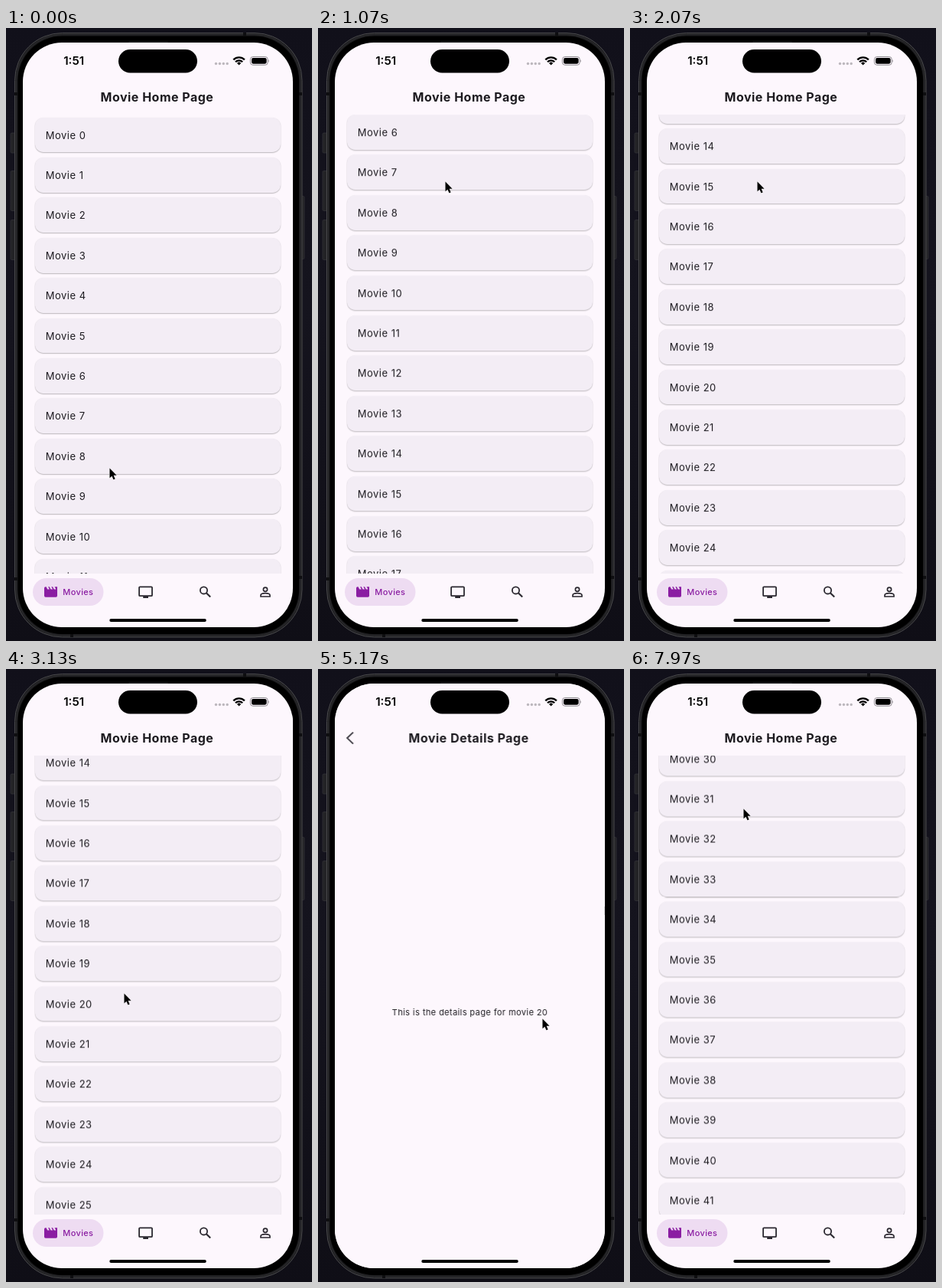
Recreate the animation shown at these times as an HTML page. Size 400x800 px, loop 8 s.

```html
<!DOCTYPE html>
<html lang="en">
<head>
<meta charset="utf-8">
<title>Movie list</title>
<style>
  html, body { margin: 0; width: 100%; height: 100%; overflow: hidden; background: #100f17; }
  #stage { position: absolute; left: 0; top: 0; width: 400px; height: 800px; overflow: hidden;
    background: linear-gradient(#11101a, #15141e 45%, #0f0e16);
    font-family: Inter, "Liberation Sans", sans-serif; color: #1d1b20; }
  svg { position: absolute; left: 0; top: 0; display: block; }
  text { fill: #1d1b20; font-family: Inter, "Liberation Sans", sans-serif; }
  #screen { position: absolute; left: 22px; top: 19px; width: 353px; height: 763px;
    border-radius: 51px; overflow: hidden; background: #fdf7fd; }
  #screen svg { left: -22px; top: -19px; }
  #view { position: absolute; left: 0; top: 94px; width: 353px; height: 599px; overflow: hidden; }
  #list, #page { position: absolute; left: 0; top: 0; width: 353px; will-change: transform; }
  #page { height: 763px; overflow: hidden; background: #fdf7fd; }
  .card { position: absolute; left: 16.3px; width: 320.4px; height: 45.8px; border-radius: 10.8px;
    background: #f3edf5; box-shadow: 0 1px 1.4px rgba(0,0,0,.21), 0 .4px 1.6px rgba(0,0,0,.1);
    font-size: 13px; line-height: 46px; letter-spacing: .5px; text-indent: 13.4px; white-space: nowrap; }
  .title { font-size: 16px; font-weight: 700; letter-spacing: .48px; }
  .line { fill: none; stroke: #2b2830; stroke-width: 1.8; }
</style>
</head>
<body>
<div id="stage">
  <svg width="400" height="800">
    <g fill="#232326" stroke="#36363a" stroke-width=".7">
      <rect x="6" y="137" width="8" height="26" rx="1.5"/>
      <rect x="6" y="186.500" width="8" height="52" rx="1.5"/>
      <rect x="6" y="250.500" width="8" height="52" rx="1.5"/>
      <rect x="384" y="219.500" width="6" height="82" rx="1.5"/>
    </g>
    <rect x="11.500" y="6.500" width="375.500" height="788.500" rx="62" fill="#1d1d1f" stroke="#4a4a4d"/>
    <rect x="13.500" y="8.500" width="371.500" height="784.500" rx="60" fill="none" stroke="#2d2d30"/>
    <g fill="#0e0e10">
      <rect x="310" y="6" width="4" height="4"/><rect x="84" y="791" width="4" height="4"/>
      <rect x="11" y="84" width="4" height="4"/><rect x="383" y="84" width="4" height="4"/>
      <rect x="11" y="717" width="4" height="4"/><rect x="383" y="715" width="4" height="4"/>
    </g>
    <rect x="15.500" y="10.500" width="367.500" height="780.500" rx="58" fill="#000"/>
    <rect x="160" y="17" width="52" height="1.500" rx=".7" fill="#202022"/>
  </svg>

  <div id="screen">
    <div id="view"><div id="list"></div></div>
    <svg width="400" height="800">
      <text class="title" x="123.600" y="95.800">Movie Home Page</text>
      <rect x="35" y="718" width="92.500" height="36" rx="18" fill="#eedcf2"/>
      <path fill="#8a1da2" transform="translate(48.3 725.800) scale(.85)"
        d="M18 4l2 4h-3l-2-4h-2l2 4h-3l-2-4H8l2 4H7L5 4H4a2 2 0 0 0-2 2v12a2 2 0 0 0 2 2h16a2 2 0 0 0 2-2V4z"/>
      <text x="74.300" y="740" style="font-size:11px;font-weight:500;letter-spacing:.36px;fill:#8a1da2">Movies</text>
      <g class="line">
        <rect x="174.100" y="729.300" width="16.900" height="11.900" rx="1"/>
        <path d="M179.200 743H186" stroke-width="2"/>
        <circle cx="258.500" cy="733.900" r="4.600"/>
        <path d="M261.800 737.300L267.200 742.600" stroke-width="2.100"/>
        <circle cx="339" cy="732.800" r="2.600" stroke-width="1.700"/>
        <path d="M333 742V740.300C333 738.300 336.800 737.600 339 737.600S345 738.300 345 740.300V742Z" stroke-width="1.700"/>
      </g>
    </svg>
    <div id="page">
      <svg width="400" height="800">
        <circle id="press" cx="42" cy="90.200" r="16.300" fill="#1d1b20"/>
        <path d="M46 82.600L38.200 90.100L46 97.600" fill="none" stroke="#45424a" stroke-width="2"/>
        <text class="title" x="118.500" y="95.800">Movie Details Page</text>
        <text x="96.800" y="451.900" style="font-size:11px;letter-spacing:.41px">This is the details page for movie 20</text>
      </svg>
    </div>
  </div>

  <svg width="400" height="800">
    <rect x="147" y="28" width="103" height="30.500" rx="15.250"/>
    <text x="88.700" y="48.300" text-anchor="middle" style="font-size:15.2px;font-weight:600;fill:#000">1:51</text>
    <g fill="#bcb7bd">
      <circle cx="274.500" cy="46.500" r="1.700"/><circle cx="279.400" cy="46.500" r="1.700"/>
      <circle cx="284.300" cy="46.500" r="1.700"/><circle cx="289.200" cy="46.500" r="1.700"/>
    </g>
    <g fill="none" stroke="#000" stroke-width="2.300">
      <path d="M297.300 41.400A10.300 10.300 0 0 1 311.900 41.400"/>
      <path d="M300 44.200A6.500 6.500 0 0 1 309.200 44.200"/>
    </g>
    <path d="M304.600 48.500L302 45.900A3.700 3.700 0 0 1 307.200 45.900Z"/>
    <rect x="319.400" y="37.500" width="22.800" height="10.800" rx="3.400" fill="none" stroke="#8f8b91"/>
    <rect x="321" y="39.100" width="19.600" height="7.600" rx="2.100"/>
    <path d="M343.200 41.200Q345 42.900 343.200 44.700Z" fill="#8f8b91"/>
    <rect x="135.300" y="771" width="126.500" height="4" rx="2"/>
    <g id="cursor" style="filter:drop-shadow(0 .6px .7px rgba(0,0,0,.25))">
      <path transform="translate(.5 .5) scale(.9)" d="M0 0V14.200L3.300 11.300L5.500 16.500L7.900 15.500L5.700 10.400H10Z"
        stroke="#fff" stroke-width=".9" paint-order="stroke"/>
    </g>
  </svg>
</div>

<script>
const LOOP = 8000, PITCH = 52.4, WIDTH = 353, FRICTION = 2.1;
const $ = id => document.getElementById(id);
const list = $('list'), page = $('page'), press = $('press'), cursor = $('cursor');

for (let i = 0; i < 45; i++) {
  const card = document.createElement('div');
  card.className = 'card';
  card.textContent = 'Movie ' + i;
  card.style.top = (3.6 + i * PITCH) + 'px';
  list.append(card);
}

// Each swipe: a drag that speeds up, then a fling that dies away and is held at stop.
const swipes = [
  { start: 640, end: 1070, from: 0, drag: 316.9, power: 1.305, glide: 458, stop: 750.7 },
  { start: 7480, end: 7720, from: 750.7, drag: 378, power: 1.516, glide: 1137, stop: Infinity }
];

// Pointer stops: time, x, y
const stops = [
  [0, 135, 574], [200, 140, 560], [640, 165, 517], [1070, 166, 200],
  [2480, 166, 200], [2950, 154, 423], [3630, 154, 423], [3780, 118, 290],
  [3930, 109, 120], [4030, 150, 67], [4160, 240, 110], [4290, 288, 330],
  [4430, 268, 590], [4480, 255, 616], [4640, 202, 590], [4850, 240, 500],
  [5030, 297, 470], [5170, 293, 456], [5470, 293, 456], [5560, 288, 470],
  [5800, 190, 320], [6100, 45, 130], [6160, 40, 112], [6270, 53, 98],
  [6530, 53, 98], [6565, 53, 97], [6600, 53, 98], [7130, 53, 98],
  [7440, 140, 560], [7480, 142, 560], [7720, 148, 182], [8000, 148, 182]
];

const clamp = v => Math.max(0, Math.min(1, v));
const ramp = (t, start, length) => clamp((t - start) / length);

function scrollAt(t) {
  const s = t < swipes[1].start ? swipes[0] : swipes[1];
  const dragged = s.drag * Math.pow(ramp(t, s.start, s.end - s.start), s.power);
  const coast = Math.max(0, t - s.end) / 1000;
  return Math.min(s.stop, s.from + dragged + s.glide * (1 - Math.exp(-FRICTION * coast)));
}

function slope(i, k) {
  const a = stops[i], b = stops[i + 1];
  return a && b ? (b[k] - a[k]) / (b[0] - a[0]) : 0;
}

// Harmonic mean keeps the curve from overshooting its stops.
function tangent(i, k) {
  const a = slope(i - 1, k), b = slope(i, k);
  return a * b > 0 ? 2 * a * b / (a + b) : 0;
}

function pointer(t, k) {
  let i = 0;
  while (i < stops.length - 2 && t >= stops[i + 1][0]) i++;
  const a = stops[i], b = stops[i + 1], h = b[0] - a[0];
  const u = ramp(t, a[0], h), v = 1 - u;
  return v * v * (1 + 2 * u) * a[k] + u * u * (3 - 2 * u) * b[k]
    + h * u * v * (v * tangent(i, k) - u * tangent(i + 1, k));
}

function pointerY(t) {
  const s = swipes.find(w => t >= w.start && t < w.end);
  if (!s) return pointer(t, 2);
  return pointer(s.start, 2) - (scrollAt(t) - s.from);
}

function draw(t) {
  const scroll = scrollAt(t);
  const shown = ramp(t, 3130, 300) - ramp(t, 6800, 300);
  list.style.transform = `translateY(${-scroll}px)`;
  page.style.transform = `translateX(${WIDTH * (1 - shown)}px)`;
  page.style.visibility = shown > 0 ? 'visible' : 'hidden';
  press.style.opacity = .11 * ramp(t, 6800, 150);
  cursor.setAttribute('transform', `translate(${pointer(t, 1)} ${pointerY(t)})`);
}

const begin = performance.now();
function tick() {
  draw((performance.now() - begin) % LOOP);
  requestAnimationFrame(tick);
}
draw(0);
requestAnimationFrame(tick);
</script>
</body>
</html>
```
